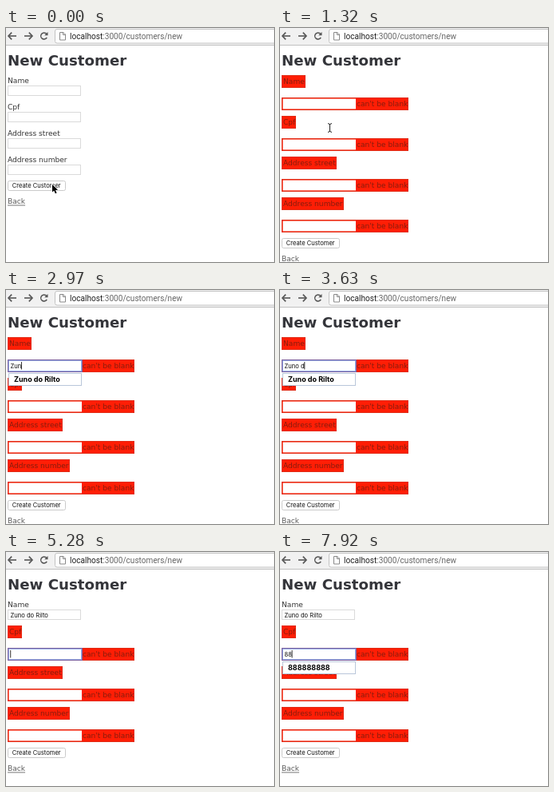
Animation, 336 px wide and 293 px high, one loop 8000 ms. Source, as an HTML page with a canvas:

```html
<!DOCTYPE html>
<html lang="en">
<head>
<meta charset="utf-8">
<title>New Customer</title>
<style>
html, body { margin: 0; width: 100%; height: 100%; overflow: hidden; background: #fff; }
canvas { display: block; width: 336px; height: 293px; }
</style>
</head>
<body>
<canvas id="stage"></canvas>
<script>
const W = 336, H = 293, LOOP = 8000, TICK = 330;
const canvas = document.getElementById('stage');
const ctx = canvas.getContext('2d');
const dpr = window.devicePixelRatio || 1;
canvas.width = W * dpr;
canvas.height = H * dpr;

const BODY = '9.1px "DejaVu Sans", sans-serif';
const TITLE = 'bold 18.2px "DejaVu Sans", sans-serif';
const CONTROL = '7.6px Inter, sans-serif';
const OPTION = 'bold 9px Inter, sans-serif';
const URL_FONT = '10.1px Roboto, sans-serif';
const RED = '#ff1e05', RED_EDGE = '#e02c16', ON_RED = '#861c0e', INK = '#333';

const LABELS = ['Name', 'Cpf', 'Address street', 'Address number'];
const CUSTOMER = 'Zuno do Rilto', CPF = '888888888';
const FORM_TOP = 59, GOOD_HEIGHT = 33, BAD_HEIGHT = 51;

// [tick, x, y] of the text cursor
const BEAM = [[1, 58.5, 197], [2, 56.5, 151], [3, 56.5, 139], [4, 62.5, 125], [5, 50.5, 96.5]];
// [tick, number of typed letters]
const NAME_KEYS = [[8, 1], [9, 3], [10, 4], [11, 6], [12, 8], [13, 9], [14, 10], [15, 13]];
const CPF_KEYS = [[23, 1], [24, 2]];

const latest = (steps, tick) => steps.filter(s => s[0] <= tick).pop();
const typed = (keys, tick) => (latest(keys, tick) || [0, 0])[1];

function rect(x, y, w, h, color) {
  ctx.fillStyle = color;
  ctx.fillRect(x, y, w, h);
}

function frame(x, y, w, h, color) {
  ctx.strokeStyle = color;
  ctx.lineWidth = 1;
  ctx.strokeRect(x + 0.5, y + 0.5, w - 1, h - 1);
}

function panel(x, y, w, h, fill, border) {
  rect(x, y, w, h, fill);
  frame(x, y, w, h, border);
}

function text(str, x, y, font, color = INK) {
  ctx.font = font;
  ctx.fillStyle = color;
  ctx.fillText(str, x, y);
  return ctx.measureText(str).width;
}

function path(points, color, width, close) {
  ctx.beginPath();
  points.forEach(([x, y]) => ctx.lineTo(x, y));
  if (close) ctx.closePath();
  ctx.strokeStyle = color;
  ctx.lineWidth = width;
  ctx.stroke();
}

function roundBox(x, y, w, h, r, border) {
  ctx.beginPath();
  ctx.roundRect(x, y, w, h, r);
  ctx.fillStyle = '#fff';
  ctx.fill();
  ctx.strokeStyle = border;
  ctx.lineWidth = 1;
  ctx.stroke();
}

function arrow(x, dir) {
  const tip = x + dir * 5;
  path([[x - dir * 5, 10], [tip, 10]], '#555', 1.6);
  path([[tip - dir * 4.2, 5.6], [tip, 10], [tip - dir * 4.2, 14.4]], '#555', 1.6);
}

function toolbar() {
  rect(0, 0, W, 21, '#f1f1f1');
  rect(0, 21, W, 1, '#c0c0c0');
  roundBox(61.5, 1.5, W, 17.5, 2.5, '#c2c2c2');
  arrow(8, -1);
  arrow(28, 1);

  ctx.beginPath();
  ctx.arc(47.7, 10, 4, 0.5, 5.5);
  ctx.strokeStyle = '#555';
  ctx.lineWidth = 1.5;
  ctx.stroke();
  ctx.beginPath();
  ctx.moveTo(52.5, 5);
  ctx.lineTo(52.5, 9.3);
  ctx.lineTo(48.2, 9.3);
  ctx.fillStyle = '#555';
  ctx.fill();

  path([[67.5, 5.5], [72, 5.5], [74.5, 8], [74.5, 15], [67.5, 15]], '#888', 1, true);
  path([[71.5, 5.5], [71.5, 8.5], [74.5, 8.5]], '#888', 1);
  const w = text('localhost', 80, 14, URL_FONT, '#222');
  text(':3000/customers/new', 80 + w, 14, URL_FONT, '#666');
}

function goodField(label, value, y) {
  text(label, 2, y + 10.3, BODY);
  panel(2, y + 13, 92, 13, '#fff', '#dadada');
  text(value, 5.5, y + 22.5, CONTROL, '#111');
}

function badField(label, focus, y) {
  ctx.font = BODY;
  panel(2, y, Math.round(ctx.measureText(label).width + 3), 16, RED, RED_EDGE);
  text(label, 4, y + 11.4, BODY, ON_RED);

  const top = y + 28;
  panel(2, top, 159, 16, RED, RED_EDGE);
  text("can't be blank", 96, top + 11.2, BODY, ON_RED);
  rect(3.6, top + 1.6, 91.4, 12.8, '#fff');
  if (!focus) return;

  frame(2, top, 94, 16, '#7b5f9e');
  frame(3, top + 1, 92, 14, '#95abe4');
  const w = text(focus.value, 5.5, top + 11.2, CONTROL, '#111');
  if (focus.caret) rect(5.2 + w, top + 3, 1, 9.5, '#333');
}

function form(tick) {
  const stage = tick < 1 ? 0 : tick < 16 ? 1 : 2;
  const active = stage === 2 ? 1 : tick >= 6 ? 0 : -1;
  const keys = active ? CPF_KEYS : NAME_KEYS;
  const answer = active ? CPF : CUSTOMER;
  const count = typed(keys, tick);
  const hidden = tick === 6 || tick === 19 || tick === 22;
  let y = FORM_TOP, menuY = 0;

  text('New Customer', 2, 47, TITLE, '#34353a');
  LABELS.forEach((label, i) => {
    if (stage === 0 || (stage === 2 && i === 0)) {
      goodField(label, stage ? CUSTOMER : '', y);
      y += GOOD_HEIGHT;
      return;
    }
    const focus = stage && i === active && { value: answer.slice(0, count), caret: !hidden };
    badField(label, focus, y);
    if (focus) menuY = y + 45;
    y += BAD_HEIGHT;
  });

  if (stage && count) {
    panel(3, menuY, 92, 16, '#fff', '#b9c6da');
    text(answer, 10, menuY + 11.3, OPTION, '#000');
  }

  roundBox(2.5, y + 0.5, 72, 12, 2, '#cacaca');
  text('Create Customer', 7.7, y + 9.4, CONTROL, '#111');
  const w = text('Back', 2, y + 29.2, BODY, '#5c5c5c');
  rect(2, y + 30.5, w, 1, '#777');
}

function pointer(x, y) {
  ctx.beginPath();
  [[0, 0], [0, 9.5], [2.2, 7.5], [3.8, 11.2], [5.6, 10.4], [4, 6.9], [7, 6.7]]
    .forEach(([dx, dy]) => ctx.lineTo(x + dx, y + dy));
  ctx.closePath();
  ctx.strokeStyle = '#fff';
  ctx.lineWidth = 1.4;
  ctx.stroke();
  ctx.fillStyle = '#000';
  ctx.fill();
}

function beam(x, y) {
  path([[x, y - 5], [x, y + 5]], '#222', 1);
  for (const s of [-1, 1]) {
    path([[x - 2.5, y + s * 5.5], [x, y + s * 4.5], [x + 2.5, y + s * 5.5]], '#222', 1);
  }
}

function draw(ms) {
  const tick = Math.floor((ms % LOOP) / TICK);
  ctx.setTransform(dpr, 0, 0, dpr, 0, 0);
  rect(0, 0, W, H, '#fff');
  toolbar();
  form(tick);
  if (tick < 1) pointer(58, 196);
  else if (tick < 8) {
    const [, x, y] = latest(BEAM, tick);
    beam(x, y);
  }
}

const start = performance.now();
function loop() {
  draw(performance.now() - start);
  requestAnimationFrame(loop);
}
loop();
</script>
</body>
</html>
```
